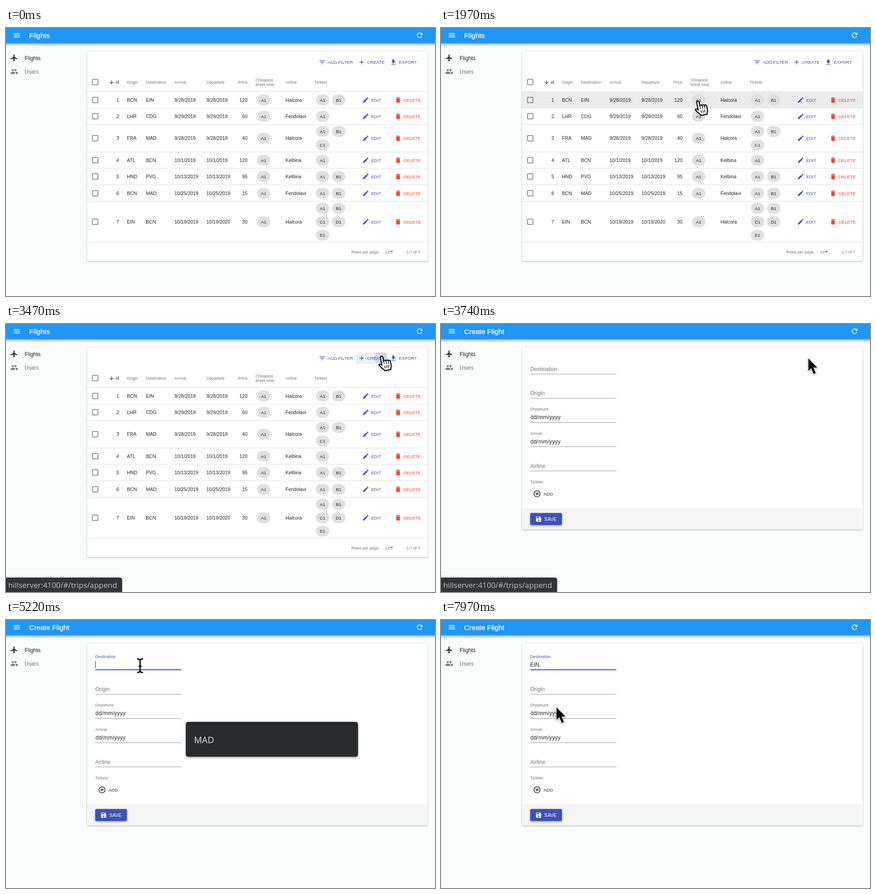
Write an HTML page with a canvas that moves like this. It is 947x592 px and loops after 8 s.

```html
<!DOCTYPE html>
<html lang="en">
<head>
<meta charset="utf-8">
<title>Flights admin</title>
<style>
html, body { margin: 0; width: 100%; height: 100%; overflow: hidden; background: #fafbfb; }
canvas { display: block; width: 947px; height: 592px; }
</style>
</head>
<body>
<canvas id="stage" width="947" height="592"></canvas>
<script>
const ctx = document.getElementById('stage').getContext('2d');
const LOOP = 8000;
const SANS = '"Liberation Sans", Arial, sans-serif';
const WIDE = '"Open Sans", sans-serif';
const INDIGO = '#3f51b5', RED = '#f44336';
const DARK = 'rgba(0,0,0,.87)', GREY = 'rgba(0,0,0,.54)', RULE = '#e0e0e0';

// Icons on a 24 unit grid
const ICONS = {
  menu: 'M3 18h18v-2H3zM3 13h18v-2H3zM3 6v2h18V6z',
  refresh: 'M17.65 6.35C16.2 4.9 14.21 4 12 4c-4.42 0-7.99 3.58-7.99 8s3.57 8 7.99 8c3.73 0 6.84-2.55 7.73-6h-2.08c-.82 2.33-3.04 4-5.65 4-3.31 0-6-2.69-6-6s2.69-6 6-6c1.66 0 3.14.69 4.22 1.78L13 11h7V4z',
  plane: 'M21 16v-2l-8-5V3.5c0-.83-.67-1.5-1.5-1.5S10 2.67 10 3.5V9l-8 5v2l8-2.5V19l-2 1.5V22l3.5-1 3.5 1v-1.5L13 19v-5.5z',
  people: 'M16 11c1.66 0 3-1.34 3-3s-1.34-3-3-3-3 1.34-3 3 1.34 3 3 3zM8 11c1.66 0 3-1.34 3-3S9.66 5 8 5 5 6.34 5 8s1.34 3 3 3zM8 13c-2.33 0-7 1.17-7 3.5V19h14v-2.5c0-2.33-4.67-3.5-7-3.5zM16 13l-.97.05C16.2 13.9 17 15 17 16.5V19h6v-2.5c0-2.33-4.67-3.5-7-3.5z',
  filter: 'M10 18h4v-2h-4zM3 6v2h18V6zM6 13h12v-2H6z',
  plus: 'M19 13h-6v6h-2v-6H5v-2h6V5h2v6h6z',
  download: 'M19 9h-4V3H9v6H5l7 7zM5 18v2h14v-2z',
  pencil: 'M3 17.25V21h3.75L17.81 9.94l-3.75-3.75zM20.71 7.04c.39-.39.39-1.02 0-1.41l-2.34-2.34c-.39-.39-1.02-.39-1.41 0l-1.83 1.83 3.75 3.75z',
  bin: 'M6 19c0 1.1.9 2 2 2h8c1.1 0 2-.9 2-2V7H6zM19 4h-3.5l-1-1h-5l-1 1H5v2h14z',
  down: 'M20 12l-1.41-1.41L13 16.17V4h-2v12.17l-5.58-5.59L4 12l8 8z',
  addRing: 'M13 7h-2v4H7v2h4v4h2v-4h4v-2h-4zM12 2C6.48 2 2 6.48 2 12s4.48 10 10 10 10-4.48 10-10S17.52 2 12 2zM12 20c-4.41 0-8-3.59-8-8s3.59-8 8-8 8 3.59 8 8-3.59 8-8 8z',
  disk: 'M17 3H5c-1.1 0-2 .9-2 2v14c0 1.1.9 2 2 2h14c1.1 0 2-.9 2-2V7zM12 19c-1.66 0-3-1.34-3-3s1.34-3 3-3 3 1.34 3 3-1.34 3-3 3zM15 9H5V5h10z',
  box: 'M19 5v14H5V5zM19 3H5c-1.1 0-2 .9-2 2v14c0 1.1.9 2 2 2h14c1.1 0 2-.9 2-2V5c0-1.1-.9-2-2-2z',
  caret: 'M7 10l5 5 5-5z'
};
for (const k in ICONS) ICONS[k] = new Path2D(ICONS[k]);

const HAND = new Path2D('M-2.7 18V1.2a2.7 2.7 0 0 1 5.4 0V10a2.6 2.2 0 0 1 5.1 .6a2.5 2.2 0 0 1 5 1.2a2.3 2.2 0 0 1 4.4 1.4V21C17.2 26 15 26 14.6 31H1C0 27-4 25-6.5 20.5L-8.8 16.8C-9.5 14-6-13.6-2.7 18z'.replace('-6-13.6-2.7', '-6 13.6 -2.7'));
const ARROW = new Path2D('M0 0V27.5L6.4 21.8L11.4 34.6L16.2 32.6L11.2 20.2H19.6z');

// Flight rows: centre, top, bottom, cells, tickets
const ROWS = [
  [159, 141, 177, 'BCN', 'EIN', '9/28/2019', '9/28/2019', 120, 'Halcora', 2],
  [195, 177, 213, 'LHR', 'CDG', '9/29/2019', '9/29/2019', 60, 'Fendolavi', 1],
  [243.5, 213, 274, 'FRA', 'MAD', '9/28/2019', '9/28/2019', 40, 'Halcora', 3],
  [292, 274, 310, 'ATL', 'BCN', '10/1/2019', '10/1/2019', 120, 'Kelbina', 1],
  [328, 310, 346, 'HND', 'PVG', '10/13/2019', '10/13/2019', 95, 'Kelbina', 2],
  [365, 346, 383, 'BCN', 'MAD', '10/25/2019', '10/25/2019', 15, 'Fendolavi', 2],
  [428, 383, 473, 'EIN', 'BCN', '10/19/2019', '10/19/2020', 30, 'Halcora', 5]
];

// Pointer steps: start time, shape, x, y
const POINTER = [
  [0], [1470, 'arrow', 585, 520], [1720, 'hand', 573, 409], [1970, 'hand', 567, 163],
  [2240, 'arrow', 627, 93], [2470, 'arrow', 707, 95], [2720, 'hand', 781, 77],
  [2970, 'hand', 826, 72], [3220, 'hand', 829, 73], [3740, 'arrow', 811, 76],
  [3970, 'arrow', 657, 118], [4220, 'arrow', 405.5, 146], [4470, 'arrow', 330, 120],
  [4720, 'beam', 296, 101], [7970, 'arrow', 255, 193]
];
const STATUS = [[0, 0], [3220, .6], [3470, 1], [3970, .4], [4220, 0]];
const TYPED = [[0, ''], [6720, 'E'], [6970, 'EI'], [7220, 'EIN']];
const BLINK = [[0, 0], [4970, 1], [5470, 0], [5970, 1], [6470, 0], [6720, 1], [7720, 0]];

const at = (steps, t) => steps.findLast(s => s[0] <= t);

// Text placed by the middle of its capitals
function text(str, x, y, size = 10.5, color = DARK, align = 'left', font = SANS, weight = 400) {
  ctx.font = `${weight} ${size}px ${font}`;
  ctx.textAlign = align;
  ctx.fillStyle = color;
  ctx.fillText(str, x, y + size * .36);
}

function icon(name, x, y, size, color) {
  ctx.save();
  ctx.translate(x - size / 2, y - size / 2);
  ctx.scale(size / 24, size / 24);
  ctx.fillStyle = color;
  ctx.fill(ICONS[name], 'evenodd');
  ctx.restore();
}

function rect(x, y, w, h, color) {
  ctx.fillStyle = color;
  ctx.fillRect(x, y, w, h);
}

function rounded(x, y, w, h, r, color) {
  ctx.beginPath();
  ctx.roundRect(x, y, w, h, r);
  ctx.fillStyle = color;
  ctx.fill();
}

function shadowed(alpha, blur, dy, draw) {
  ctx.save();
  ctx.shadowColor = `rgba(0,0,0,${alpha})`;
  ctx.shadowBlur = blur;
  ctx.shadowOffsetY = dy;
  draw();
  ctx.restore();
}

function button(name, label, ix, tx, y, color) {
  icon(name, ix, y, 16, color);
  text(label, tx, y, 9.75, color);
}

function chip(label, x, y) {
  rounded(x, y - 12, 29.5, 24, 12, '#e0e0e0');
  text(label, x + 14.75, y, 9.75, DARK, 'center');
}

function frame(title) {
  rect(0, 0, 947, 592, '#fafbfb');
  shadowed(.4, 6, 2, () => rect(-10, -10, 967, 43.5, '#2196f3'));
  icon('menu', 24, 16, 18, '#fff');
  icon('refresh', 913, 16, 18, '#fff');
  text(title, 51, 16.5, 15.5, '#fff');
  ctx.strokeStyle = '#fff';
  ctx.lineWidth = .3;
  ctx.strokeText(title, 51, 16.5 + 15.5 * .36);
  icon('plane', 18, 66, 18, DARK);
  text('Flights', 41, 66.5, 12);
  icon('people', 18, 96, 18, GREY);
  text('Users', 41, 96.5, 12, GREY);
}

function card(bottom) {
  shadowed(.32, 3, 1, () => rounded(179, 51.5, 752, bottom - 51.5, 3, '#fff'));
}

function listPage(t) {
  frame('Flights');
  card(515);
  if (t >= 3470) {
    ctx.save();
    ctx.beginPath();
    ctx.roundRect(772, 63, 70, 25, 3);
    ctx.clip();
    rect(772, 63, 70, 25, 'rgba(63,81,181,.09)');
    rounded(813, 60, 28, 28, 14, 'rgba(63,81,181,.16)');
    ctx.restore();
  }
  button('filter', 'ADD FILTER', 698, 710, 75.5, INDIGO);
  button('plus', 'CREATE', 785, 797, 75.5, INDIGO);
  button('download', 'EXPORT', 855, 867, 75.5, INDIGO);

  icon('box', 197, 119.5, 18, GREY);
  icon('down', 233, 119.5, 13, DARK);
  text('Id', 242, 119.5, 9);
  const heads = [['Origin', 267], ['Destination', 309], ['Arrival', 372], ['Departure', 442.5],
    ['Price', 512.5], ['Airline', 617], ['Tickets', 681]];
  for (const [label, x] of heads) text(label, x, 119.5, 9, GREY);
  text('Cheapest', 551, 114.5, 9, GREY);
  text('ticket.seat', 551, 125, 9, GREY);
  rect(179, 140, 752, 1, RULE);

  ROWS.forEach(([y, top, bottom, from, to, arrive, leave, price, airline, tickets], i) => {
    if (i === 0 && t >= 1970 && t < 2240) rect(179, top, 752, bottom - top, 'rgba(0,0,0,.075)');
    if (i === 6 && t >= 1720 && t < 1970) rect(179, top, 752, bottom - top, 'rgba(0,0,0,.02)');
    icon('box', 197, y, 18, GREY);
    text(i + 1, 249.5, y, 10.5, DARK, 'right');
    text(from, 267, y);
    text(to, 309, y);
    text(arrive, 372, y);
    text(leave, 442.5, y);
    text(price, 533, y, 10.5, DARK, 'right');
    chip('A1', 554, y);
    text(airline, 617, y);
    const lines = Math.ceil(tickets / 2);
    for (let n = 0; n < tickets; n++) {
      chip('ABCDE'[n] + '1', 684 + n % 2 * 35.5, y + (Math.floor(n / 2) - (lines - 1) / 2) * 29.8);
    }
    button('pencil', 'EDIT', 794, 806, y, INDIGO);
    button('bin', 'DELETE', 865.5, 877.5, y, RED);
    rect(179, Math.floor(bottom) - .5, 752, 1, RULE);
  });

  text('Rows per page:', 762, 494.5, 9, GREY);
  text('10', 837, 494.5, 9, GREY);
  icon('caret', 851, 494, 18, GREY);
  text('1-7 of 7', 914, 494.5, 9, GREY, 'right');
}

function underline(y, color = 'rgba(0,0,0,.42)') {
  rect(197, y, 190, 1, color);
}

function destination(t) {
  const grow = t < 4970 ? 0 : t < 5220 ? .75 : 1;
  const typed = at(TYPED, t)[1];
  text('Destination', 197, 99.5 - 18.5 * grow, 12 - 3 * grow, grow ? INDIGO : GREY);
  underline(110);
  if (t >= 4720 && grow < 1) rect(197, 109, 190, 2, DARK);
  if (grow) rect(292 - 95 * grow, 109, 190 * grow, 2, INDIGO);
  text(typed, 197, 98.5, 12);
  if (at(BLINK, t)[1]) rect(197 + Math.round(ctx.measureText(typed).width), 91, 1, 15, DARK);
}

function formPage(t) {
  frame('Create Flight');
  card(454);
  destination(t);
  text('Origin', 197, 153, 12, GREY);
  underline(163.5);
  for (const [label, y] of [['Departure', 188], ['Arrival', 241.5]]) {
    text(label, 197, y, 9, GREY);
    ctx.letterSpacing = '.25px';
    text('dd/mm/yyyy', 197.5, y + 18, 12);
    ctx.letterSpacing = '0px';
    underline(y + 29);
  }
  text('Airline', 197, 313.5, 12, GREY);
  underline(324);
  text('Tickets', 197, 349, 9, GREY);
  icon('addRing', 212, 375, 18, DARK);
  text('ADD', 226.5, 375.5, 9.75);
  rounded(179, 407, 752, 47, [0, 0, 3, 3], '#f5f5f5');
  shadowed(.4, 4, 1.5, () => rounded(197, 417.5, 70, 26.5, 3, INDIGO));
  icon('disk', 215.5, 431, 15, '#fff');
  text('SAVE', 228, 431, 10.5, '#fff');
  if (t >= 5220 && t < 6720) {
    shadowed(.4, 5, 2, () => rounded(397, 225, 380, 77, 5, '#292a2d'));
    text('MAD', 415, 264.5, 19.5, '#e3e4e6', 'left', WIDE, 500);
  }
}

function status(alpha) {
  if (!alpha) return;
  ctx.globalAlpha = alpha;
  rounded(-1, 560, 257.5, 33, [0, 5, 0, 0], '#323336');
  text('hillserver:4100/#/trips/append', 5, 577, 16.85, '#bfc1c5', 'left', WIDE);
  ctx.globalAlpha = 1;
}

function beam() {
  ctx.beginPath();
  for (const s of [-1, 1]) {
    ctx.moveTo(-6.5, s * 15);
    ctx.quadraticCurveTo(-.5, s * 15, 0, s * 11);
    ctx.quadraticCurveTo(.5, s * 15, 6.5, s * 15);
  }
  ctx.moveTo(0, -12);
  ctx.lineTo(0, 12);
  ctx.moveTo(-3, 1);
  ctx.lineTo(3, 1);
  ctx.strokeStyle = '#000';
  ctx.lineWidth = 2.8;
  ctx.stroke();
}

function hand() {
  ctx.rotate(-.2);
  ctx.lineJoin = 'round';
  ctx.strokeStyle = '#111';
  ctx.lineWidth = 2.4;
  shadowed(.35, 3, 1, () => { ctx.fillStyle = '#fff'; ctx.fill(HAND); });
  ctx.stroke(HAND);
  ctx.beginPath();
  for (const [x, y] of [[2.7, 10], [7.8, 11], [12.8, 12]]) {
    ctx.moveTo(x, y);
    ctx.lineTo(x, y + 6);
  }
  for (const x of [3, 7, 11]) {
    ctx.moveTo(x, 20);
    ctx.lineTo(x, 26);
  }
  ctx.lineWidth = 1.5;
  ctx.stroke();
}

function arrow() {
  ctx.lineJoin = 'round';
  ctx.strokeStyle = '#fff';
  ctx.lineWidth = 2;
  shadowed(.5, 4, 1, () => ctx.stroke(ARROW));
  ctx.fillStyle = '#000';
  ctx.fill(ARROW);
}

function pointer([, shape, x, y]) {
  if (!shape) return;
  ctx.save();
  ctx.translate(x, y);
  ({ arrow, hand, beam })[shape]();
  ctx.restore();
}

function draw() {
  const t = performance.now() % LOOP;
  if (t < 3740) listPage(t); else formPage(t);
  status(at(STATUS, t)[1]);
  pointer(at(POINTER, t));
  requestAnimationFrame(draw);
}
draw();
</script>
</body>
</html>
```
